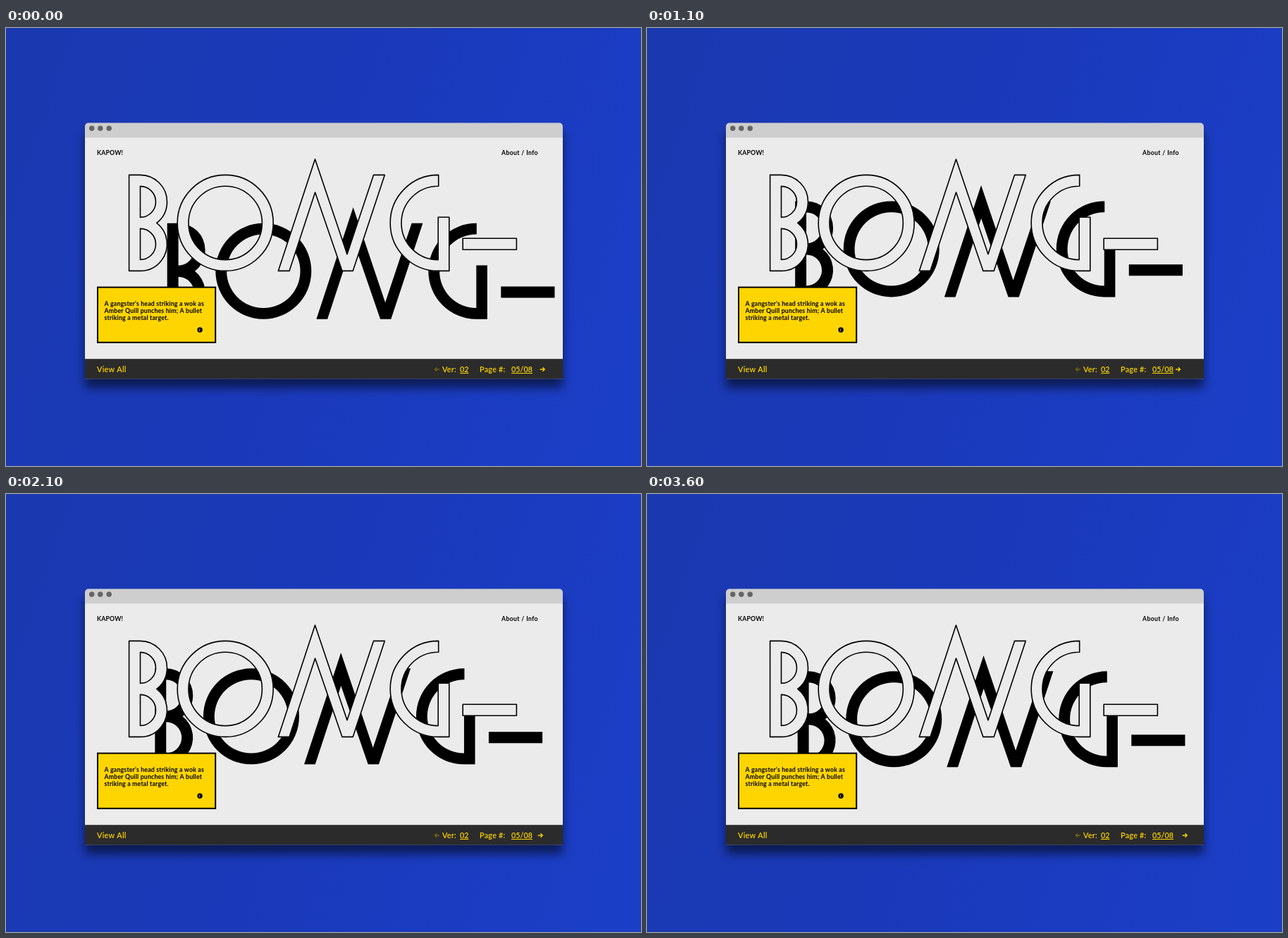
An HTML page with a canvas that plays this animation: 901x621 px, repeating every 3.7 s.

```html
<!DOCTYPE html>
<html lang="en">
<head>
<meta charset="utf-8">
<title>Bong</title>
<style>
  html, body { margin: 0; width: 100%; height: 100%; overflow: hidden; background: #1a3abc; }
  canvas { display: block; }
</style>
</head>
<body>
<canvas id="stage" width="901" height="621"></canvas>
<script>
const ctx = document.getElementById('stage').getContext('2d');
const LOOP = 3700;
const YELLOW = '#ffd500', PAPER = '#ebebeb', INK = '#000';
const FONT = 'Lato, "Open Sans", sans-serif';

// [time, shadow distance 0..1]; each pose holds until the next
const poses = [
  [0, .98], [100, .88], [200, .64], [300, .36], [400, .1], [500, 0],
  [600, .4], [700, .82], [800, .98], [1000, .45], [1100, .03],
  [1500, .76], [1700, 1], [2100, .09], [2300, 0], [2600, .92],
  [2900, .8], [3000, .6], [3100, .38], [3200, .18], [3300, .07], [3400, .21]
];
// [time, centre of the next arrow]
const nudges = [[0, 761], [500, 758.2], [800, 755], [1100, 753.3],
  [1700, 755.6], [2600, 761], [3400, 763]];

function lerpAt(list, t) {
  const i = list.findIndex(p => p[0] > t);
  if (i < 0) return list[list.length - 1][1];
  const [a, x] = list[i - 1], [b, y] = list[i];
  return x + (y - x) * (t - a) / (b - a);
}

function poly(path, points) {
  points.forEach(([x, y], i) => i ? path.lineTo(x, y) : path.moveTo(x, y));
  path.closePath();
}

function makeWord() {
  const p = new Path2D(), top = 208.4, bottom = 344.4, mid = 276.4, q = Math.PI / 2;
  // B
  const notch = Math.asin(30 / 38);
  p.moveTo(174.6, top);
  p.lineTo(190.5, top);
  p.arc(190.5, mid - 30, 38, -q, notch);
  p.arc(190.5, mid + 30, 38, -notch, q);
  p.lineTo(174.6, bottom);
  p.closePath();
  for (const y of [mid - 30, mid + 30]) {
    p.moveTo(190.5, y - 22);
    p.arc(190.5, y, 22, -q, q);
    p.closePath();
  }
  // O
  for (const r of [68, 52.2]) {
    p.moveTo(311.2 + r, mid);
    p.arc(311.2, mid, r, 0, 4 * q);
    p.closePath();
  }
  // N with a raised peak
  poly(p, [[386.3, bottom], [438.5, 186], [484, 320.8], [521.5, top], [537.3, top],
    [492.2, bottom], [477, bottom], [438.6, 233], [402, bottom]]);
  // G
  p.moveTo(613.7, top);
  p.arc(613.2, mid, 68, -q, q, true);
  p.lineTo(628.8, bottom);
  p.lineTo(628.8, 268.2);
  p.lineTo(613.2, 268.2);
  p.lineTo(613.2, mid + 52.2);
  p.arc(613.2, mid, 52.2, q, -q);
  p.lineTo(613.7, mid - 52.2);
  p.closePath();
  // dash
  p.rect(648.2, 298.2, 76.2, 16);
  return p;
}
const word = makeWord();

function box(x, y, w, h, color) {
  ctx.fillStyle = color;
  ctx.fillRect(x, y, w, h);
}

function dot(x, y, r, color) {
  ctx.fillStyle = color;
  ctx.beginPath();
  ctx.arc(x, y, r, 0, 7);
  ctx.fill();
}

function text(str, x, y, size, color, gap = 0, weight = 600) {
  ctx.font = `${weight} ${size}px ${FONT}`;
  ctx.letterSpacing = gap + 'px';
  ctx.fillStyle = color;
  ctx.fillText(str, x, y);
}

function arrow(x, dir, color) {
  const y = 484, tip = x + 3.3 * dir;
  ctx.strokeStyle = color;
  ctx.lineWidth = 1.3;
  ctx.beginPath();
  ctx.moveTo(x - 3.3 * dir, y);
  ctx.lineTo(tip, y);
  ctx.moveTo(tip - 2.8 * dir, y - 2.8);
  ctx.lineTo(tip, y);
  ctx.lineTo(tip - 2.8 * dir, y + 2.8);
  ctx.stroke();
}

function backdrop() {
  const g = ctx.createLinearGradient(0, 100, 901, 400);
  g.addColorStop(0, '#1a39b0');
  g.addColorStop(.5, '#1a39ba');
  g.addColorStop(1, '#1b3ec6');
  box(0, 0, 901, 621, g);
}

function windowFrame() {
  ctx.save();
  ctx.shadowColor = 'rgba(0,0,0,.55)';
  ctx.shadowBlur = 14;
  ctx.shadowOffsetY = 13;
  ctx.fillStyle = '#cecece';
  ctx.beginPath();
  ctx.roundRect(112, 134.6, 678, 362.6, [5, 5, 0, 0]);
  ctx.fill();
  ctx.restore();
  box(112, 155.4, 678, 314, PAPER);
  box(112, 469.2, 678, 28, '#2b2b2b');
  for (const x of [121.7, 133.8, 146.2]) dot(x, 142.2, 3.7, '#656565');
  text('KAPOW!', 129, 180, 8.8, INK, .15, 700);
  text('About / Info', 703, 180, 8.8, INK, .3, 700);
}

function lettering(s) {
  ctx.save();
  ctx.translate(35 + 19.5 * s, 36 + 33 * s);
  ctx.fillStyle = INK;
  ctx.fill(word, 'evenodd');
  ctx.restore();
  ctx.fillStyle = PAPER;
  ctx.fill(word, 'evenodd');
  ctx.strokeStyle = INK;
  ctx.lineWidth = 1.6;
  ctx.lineJoin = 'round';
  ctx.stroke(word);
  ctx.lineJoin = 'miter';
}

function caption() {
  box(129, 366.6, 169.2, 80.2, INK);
  box(131, 368.6, 165.2, 76.2, YELLOW);
  ["A gangster's head striking a wok as", 'Amber Quill punches him; A bullet',
    'striking a metal target.'].forEach((line, i) =>
    text(line, 139.5, 394 + i * 9.75, 8.8, INK, .15, 700));
  dot(275.1, 428, 3.7, INK);
  text('i', 274.1, 430.2, 6, YELLOW, 0, 'italic 700');
}

function footer(x) {
  text('View All', 129, 487.5, 10.8, YELLOW, .25);
  arrow(611.7, -1, '#756514');
  text('Ver:', 619, 487.5, 10.8, YELLOW, .25);
  text('02', 644, 487.5, 10.8, YELLOW);
  text('Page #:', 672, 487.5, 10.8, YELLOW, .25);
  text('05/08', 717, 487.5, 10.8, YELLOW);
  box(644, 489, 12.3, 1, YELLOW);
  box(717, 489, 30, 1, YELLOW);
  arrow(x, 1, YELLOW);
}

function draw(now) {
  const t = now % LOOP;
  const [start, s] = poses.findLast(p => p[0] <= t);
  backdrop();
  windowFrame();
  lettering(s);
  caption();
  footer(lerpAt(nudges, start));
}

const began = performance.now();
function tick() {
  draw(performance.now() - began);
  requestAnimationFrame(tick);
}
tick();
</script>
</body>
</html>
```
